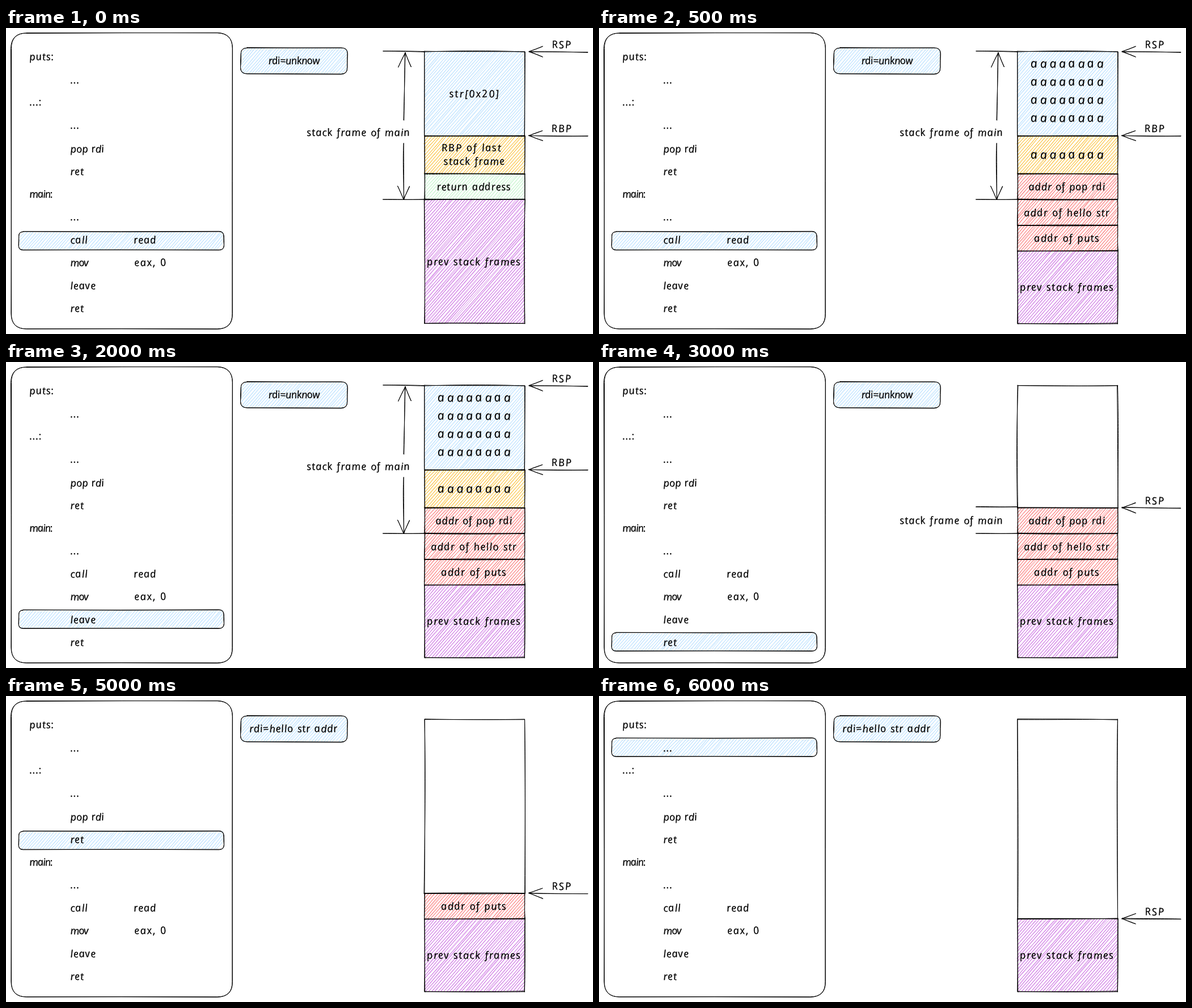
An HTML page that plays this animation: 1035 by 541 pixels, repeating every 8.5 s.

```html
<!DOCTYPE html>
<html lang="en">
<head>
<meta charset="utf-8">
<title>Stack walkthrough</title>
<style>
  html, body { margin: 0; width: 100%; height: 100%; overflow: hidden; background: #fff; }
  svg { display: block; width: 1035px; height: 541px; }
  path { fill: none; stroke: #000; stroke-width: 1; stroke-linecap: round; }
  .hatch { stroke-width: .68; }
  text { font: italic 18px "Open Sans", "Noto Sans", sans-serif; fill: #000; stroke: #000; stroke-width: .25px; }
</style>
</head>
<body>
<svg id="stage" viewBox="0 0 1035 541"></svg>
<script>
const BLUE = '#a5d8ff', YELLOW = '#fab005', GREEN = '#b2f2bb', RED = '#fa5252', VIOLET = '#be4bdb';
const LEFT = 738, RIGHT = 914.5;

// Seeded by position, so a shape keeps its wobble from state to state.
let seed = 1;
const reseed = (...v) => { seed = v.reduce((s, n) => (s * 31 + Math.round(n * 7)) % 2147483647, 17) + 1; };
const rand = () => (seed = seed * 48271 % 2147483647) / 2147483647;
const jit = a => (rand() * 2 - 1) * a;
const pt = (x, y, a = 0) => `${(x + jit(a)).toFixed(2)} ${(y + jit(a)).toFixed(2)}`;

// One hand-drawn pass of a line, slightly bowed.
function pass(x1, y1, x2, y2, a) {
  const d = .2 + rand() * .2, bx = jit((y2 - y1) / 140), by = jit((x2 - x1) / 140);
  const mid = k => pt(x1 + (x2 - x1) * k + bx, y1 + (y2 - y1) * k + by, a);
  return `M${pt(x1, y1, a)}C${mid(d)} ${mid(2 * d)} ${pt(x2, y2, a)}`;
}
const twice = (x1, y1, x2, y2, a) => pass(x1, y1, x2, y2, a) + pass(x1, y1, x2, y2, a / 2);
const line = (...p) => { reseed(...p); return `<path d="${twice(...p, .8)}"/>`; };

function hatch(x0, y0, x1, y1, color, skip = 1) {
  const s = Math.sin(49 * Math.PI / 180), c = Math.cos(49 * Math.PI / 180);
  let d = '';
  for (let k = x0 * s + y0 * c + 2; k < x1 * s + y1 * c; k += 4) {
    const a = Math.max(x0, (k - y1 * c) / s), b = Math.min(x1, (k - y0 * c) / s);
    if ((b - a) / c > skip) d += twice(a, (k - a * s) / c, b, (k - b * s) / c, Math.min(1.6, (b - a) / 8));
  }
  return `<path class="hatch" style="stroke:${color}" d="${d}"/>`;
}

function box(y0, y1, color) {
  reseed(y0, y1);
  const fill = color ? hatch(LEFT, y0, RIGHT, y1, color) : '';
  const c = [[LEFT, y0], [RIGHT, y0], [RIGHT, y1], [LEFT, y1]];
  return fill + `<path d="${c.map((p, i) => twice(...p, ...c[(i + 1) % 4], 1)).join('')}"/>`;
}

function round(x0, y0, x1, y1, r, color) {
  reseed(x0, y1 - y0, x1);
  const fill = color ? hatch(x0 + 1.5, y0 + 1.5, x1 - 1.5, y1 - 1.5, color, r) : '';
  const side = (ax, ay, bx, by) => {
    const mx = (ax + bx) / 2, my = (ay + by) / 2;
    return `Q${pt(mx, my, 1.2)} ${pt(bx, by, .7)}`;
  };
  const turn = (cx, cy, ex, ey) => `Q${pt(cx, cy, .6)} ${pt(ex, ey, .6)}`;
  const loop = () => `M${pt(x0 + r, y0, .6)}`
    + side(x0 + r, y0, x1 - r, y0) + turn(x1, y0, x1, y0 + r)
    + side(x1, y0 + r, x1, y1 - r) + turn(x1, y1, x1 - r, y1)
    + side(x1 - r, y1, x0 + r, y1) + turn(x0, y1, x0, y1 - r)
    + side(x0, y1 - r, x0, y0 + r) + turn(x0, y0, x0 + r, y0);
  return fill + `<path d="${loop()}${loop()}"/>`;
}

// Italic letter shapes set nearly upright, each tilted a little.
function text(str, x, y, { anchor = 'start', gap = 1, size = 18 } = {}) {
  reseed(x, str.length);
  const tilt = [...str].map(() => jit(4).toFixed(1)).join(' ');
  return `<text transform="translate(${x} ${y}) skewX(9)" text-anchor="${anchor}" rotate="${tilt}"
    style="font-size:${size}px;letter-spacing:${gap}px;word-spacing:1px">${str}</text>`;
}
const mid = (str, x, y, opt) => text(str, x, y, { anchor: 'middle', ...opt });

function pointer(name, y) {
  return line(1026, y + .6, 922, y - .4) + line(922, y - .4, 946, y - 9) + line(922, y - .4, 946, y + 9)
    + mid(name, 981, y - 6.5, { gap: 1.8 });
}

function code(mark) {
  const rows = [['puts:', 42, 57], ['...', 114, 98], ['...:', 42, 137], ['...', 114, 178],
    ['pop rdi', 114, 220, .2], ['ret', 114, 260], ['main:', 42, 300, -1], ['...', 114, 340],
    ['call', 114, 381], ['read', 226, 381], ['mov', 114, 421, -.8], ['eax, 0', 227, 421, 1.7],
    ['leave', 114, 462], ['ret', 114, 502]];
  return round(9, 9, 399.5, 532, 27) + round(22.5, mark, 384, mark + 32.5, 8, BLUE)
    + rows.map(([s, x, y, gap = 1]) => text(s, x, y, { gap })).join('');
}

function frameSpan(top) {
  const open = top < 100;
  return line(665, top, 737, top + .5) + line(665, 303, 737, 303)
    + mid('stack frame of main', 622.5, open ? 191 : 286.5, { gap: 1.1 })
    + (open ? line(701, 163, 704, 44) + line(704, 44, 692, 69) + line(704, 44, 714, 69)
      + line(701, 204, 701, 303) + line(701, 303, 691, 280) + line(701, 303, 711, 280) : '');
}

function stack(kind, rsp) {
  const fresh = kind === 'fresh', base = fresh ? 303 : 394;
  let out = box(base, 522.5, VIOLET) + mid('prev stack frames', 826, fresh ? 419.5 : 464.5, { gap: 1.5 });
  const row = (y0, y1, color, str, opt) => {
    if (y0 >= rsp - 3) out += box(y0, y1, color) + mid(str, 826, y1 - 16, opt);
  };
  if (fresh) {
    out += box(41.5, 190.5, BLUE) + mid('str[0x20]', 827, 122.5, { gap: 2.2 })
      + box(191, 258, YELLOW) + mid('RBP of last', 822, 218, { gap: 1.8 }) + mid('stack frame', 827, 242, { gap: 1.4 });
    row(258, 303, GREEN, 'return address');
    return out;
  }
  row(258, 303, RED, 'addr of pop rdi', { gap: .8 });
  row(303.5, 349, RED, 'addr of hello str', { gap: 1.3 });
  row(349, 394, RED, 'addr of puts', { gap: 1.4 });
  if (rsp > 100) return out + box(41.5, rsp > 300 && rsp < 310 ? 303.5 : rsp);
  out += box(41.5, 190.5, BLUE) + box(191, 258, YELLOW);
  for (const y of [70, 102, 134, 166, 231]) out += mid('aaaaaaaa', 828.5, y, { size: 21, gap: 4.8 });
  return out;
}

// start, highlight top, stack kind, RSP, frame top (0 = gone), register loaded
const steps = [
  [0, 360, 'fresh', 42, 41, 0],
  [500, 360, 'smashed', 42, 41, 0],
  [1000, 399.5, 'smashed', 42, 41, 0],
  [2000, 438.5, 'smashed', 42, 41, 0],
  [3000, 478.5, 'smashed', 258, 256, 0],
  [4000, 199.5, 'smashed', 302, 0, 0],
  [5000, 239, 'smashed', 349, 0, 1],
  [6000, 74.5, 'smashed', 394, 0, 1],
];
const LOOP = 8500;

const scene = ([, mark, kind, rsp, top, loaded]) => code(mark)
  + round(414, 35, 602, 81.5, 11, BLUE)
  + (loaded ? mid('rdi=hello str addr', 508, 64, { gap: .9 }) : mid('rdi=unknow', 508.5, 64, { gap: -.4 }))
  + stack(kind, rsp) + (top ? frameSpan(top) : '')
  + pointer('RSP', rsp) + (rsp < 100 ? pointer('RBP', 190.5) : '');

const stage = document.getElementById('stage');
stage.innerHTML = steps.map(s => `<g display="none">${scene(s)}</g>`).join('');
const groups = [...stage.children];

const start = performance.now();
let shown = -1;
function tick() {
  const t = (performance.now() - start) % LOOP;
  const now = steps.filter(s => s[0] <= t).length - 1;
  if (now !== shown) {
    groups.forEach((g, i) => g.setAttribute('display', i === now ? 'inline' : 'none'));
    shown = now;
  }
  requestAnimationFrame(tick);
}
tick();
</script>
</body>
</html>
```
